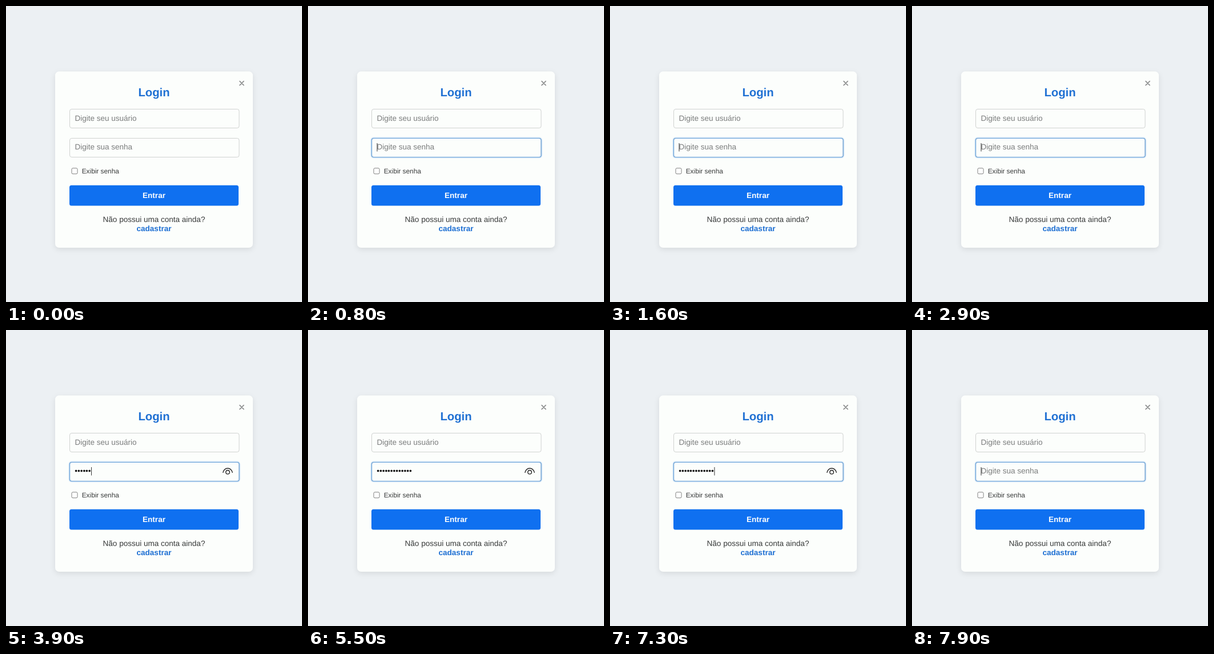
An HTML page that plays this animation: 518 by 518 pixels, repeating every 8 s.

```html
<!DOCTYPE html>
<html lang="pt-BR">
<head>
<meta charset="utf-8">
<title>Login</title>
<style>
  html, body { margin: 0; height: 100%; overflow: hidden; background: #ecf0f3; }
  svg { display: block; width: 100vw; height: 100vh; }
  text { font: 13.53px "Liberation Sans", Arial, sans-serif; fill: #383a3a; text-rendering: geometricPrecision; }
  .card { fill: #fcfefc; filter: drop-shadow(0 3px 5px rgba(0, 0, 0, .09)); }
  .field { fill: #fcfefc; stroke: #d0d2d1; }
  .hint { fill: #7b7d7d; }
  .mid { text-anchor: middle; }
  .bold { font-weight: bold; }
  .link { fill: #1f70d3; }
  .line { fill: none; stroke-linecap: round; }
  #dots { fill: #111; }
</style>
</head>
<body>
<svg viewBox="0 0 518 518">
  <rect class="card" x="86" y="114.5" width="346" height="308.5" rx="7"/>
  <path class="line" d="M409 131.7l7 7m0-7l-7 7" stroke="#8c8e8e" stroke-width="1.7"/>
  <text class="mid bold link" x="259" y="157.7" style="font-size:20.3px">Login</text>

  <rect class="field" x="111.5" y="180.5" width="296.5" height="33" rx="3.5"/>
  <text class="hint" x="120.4" y="201.2">Digite seu usuário</text>

  <rect class="field" x="111.5" y="231.5" width="296.5" height="33" rx="3.5"/>
  <g id="focus" fill="none">
    <rect x="110.2" y="230.2" width="299.1" height="35.6" rx="5" stroke="#4a95e0" stroke-opacity=".2" stroke-width="2"/>
    <rect x="111.5" y="231.5" width="296.5" height="33" rx="3.5" stroke="#5f9bd6" stroke-width="1.2"/>
  </g>
  <text class="hint" id="hint" x="120.4" y="251.4">Digite sua senha</text>
  <text id="dots" x="120.2" y="250.8"></text>
  <rect id="caret" y="240" width="1" height="14.5" fill="#333"/>
  <g id="eye" class="line" stroke="#2a2a2a" stroke-width="1.4">
    <path d="M379.8 249.4C382.5 239.6 393.5 239.6 396.2 249.4"/>
    <circle cx="388" cy="248.8" r="3.3"/>
  </g>

  <rect x="115" y="283.8" width="10" height="10" rx="2" fill="#fff" stroke="#808080"/>
  <text x="132.7" y="292.9" style="font-size:11.85px">Exibir senha</text>

  <rect x="111" y="313.7" width="296" height="35.7" rx="3.5" fill="#0f70f0"/>
  <text class="mid bold" x="259" y="335.6" style="fill:#fff">Entrar</text>
  <text class="mid" x="259" y="378.4">Não possui uma conta ainda?</text>
  <text class="mid bold link" x="259" y="394">cadastrar</text>
</svg>
<script>
  const LOOP = 8000, FOCUS = 500, CLEAR = 7800, BLINK = 500;
  const BULLET = 13.6 * 0.35;
  const $ = id => document.getElementById(id);

  // Six slow key presses, then seven quick ones.
  const keys = Array.from({ length: 13 }, (_, i) => i < 6 ? 3300 + i * 115 : 3875 + (i - 5) * 46);
  // The caret is solid from each of these moments, then blinks.
  const caretResets = [FOCUS, ...keys, 5000, CLEAR];

  function draw(t) {
    const typed = t < CLEAR ? keys.filter(k => k <= t).length : 0;
    const reset = caretResets.filter(r => r <= t).pop();
    const caretOn = reset !== undefined && Math.floor((t - reset) / BLINK) % 2 === 0;

    $("focus").setAttribute("opacity", Math.min(1, Math.max(0, (t - FOCUS + 50) / 150)));
    $("hint").setAttribute("opacity", typed ? 0 : 1);
    $("eye").setAttribute("opacity", typed ? 1 : 0);
    $("dots").textContent = "•".repeat(typed);
    $("caret").setAttribute("x", 120.5 + typed * BULLET);
    $("caret").setAttribute("opacity", caretOn ? 1 : 0);
  }

  const start = performance.now();
  function tick() {
    draw((performance.now() - start) % LOOP);
    requestAnimationFrame(tick);
  }
  tick();
</script>
</body>
</html>
```
